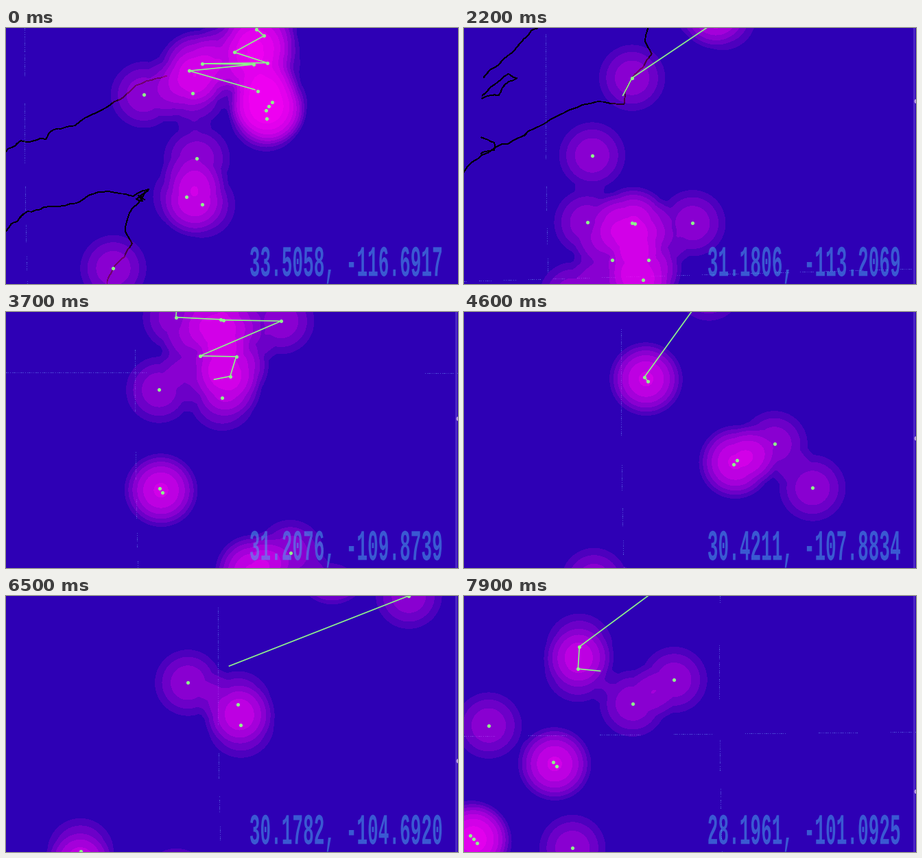
Write a matplotlib script that moves like this. It is 659 by 373 pixels and loops after 8000 ms.

```python
import numpy as np
import matplotlib.pyplot as plt
from matplotlib.animation import FuncAnimation
from matplotlib.patches import Ellipse, PathPatch, Rectangle
from matplotlib.textpath import TextPath
from matplotlib.transforms import Affine2D

W, H, DPI = 659, 373, 100
FRAMES, STEP = 80, 100
PX = 72 / DPI

BG = (46 / 255, 0, 181 / 255)
HOT = (250 / 255, 0, 245 / 255)
GREEN = "#90f48c"
LEVELS = 10

# Conic map with north to the right: pixels per degree, cone radius, cone angle
DEG, CONE, TURN = 96, 9623, .00864

# seconds, latitude, longitude of the head
KEYS = np.array([
    (0, 33.5058, -116.6917), (1.5, 32.5651, -115.2161),
    (2.9, 31.2224, -110.9420), (3.7, 31.2076, -109.8739),
    (5.4, 32.0434, -106.2903), (6.5, 30.1782, -104.6920),
    (7.9, 28.1961, -101.0925)])

TOWNS = [
    (33.53, -117.79), (33.64, -117.67), (33.19, -117.37), (33.69, -117.18),
    (32.71, -117.16), (33.49, -117.15), (32.51, -117.03), (33.55, -116.67),
    (32.56, -116.63), (31.82, -116.60), (33.68, -116.17), (32.62, -115.45),
    (32.45, -114.77), (32.69, -114.62), (31.32, -113.52), (30.71, -112.15),
    (30.62, -110.97), (31.30, -110.94), (31.34, -110.93), (32.22, -110.92),
    (30.99, -110.29), (31.54, -110.28), (31.45, -109.93), (30.37, -109.69),
    (31.33, -109.55), (32.33, -106.76), (32.90, -105.96), (29.55, -104.40),
    (30.31, -104.02), (30.35, -103.66), (27.88, -101.51), (27.86, -101.13),
    (29.32, -100.94), (28.69, -100.53), (26.50, -100.17), (27.74, -98.06)]


def chain(lat, lon, n, slope):
    """Neighbouring sites in an even diagonal row."""
    return [(lat + slope * .05 * i, lon + .07 * i) for i in range(n)]


SITES = np.array(TOWNS
                 + chain(33.77, -116.46, 3, -1)
                 + chain(30.36, -107.96, 2, 1)
                 + chain(31.76, -106.48, 2, -1)
                 + chain(27.47, -99.54, 2, 1)
                 + chain(26.19, -98.32, 3, 1))

# Key points of the shores in pixels of the view COAST_VIEW
COAST_VIEW = (88.3, 94.2, -115.2161)
PACIFIC = [(0, 140), (33, 98), (65, 57), (84, 46), (120, 44), (130, 31),
           (162, 25), (207, 0), (241, -22), (297, -46)]
GULF = [(0, 236), (40, 200), (68, 167), (92, 149), (140, 142), (196, 122),
        (247, 129), (269, 119), (234, 180), (244, 198), (216, 233),
        (205, 272), (165, 269), (90, 302), (28, 333), (0, 349), (-60, 390)]
DELTA = [(268, 121), (251, 133), (260, 136), (254, 128), (263, 134)]
ISLAND = [(-2, 267), (22, 262), (27, 251), (48, 237), (35, 231), (-2, 263)]
ISLET = [(-2, 324), (17, 331), (17, 342), (-2, 347)]


def project(lat, lon, view):
    x0, y0, mid = view
    r = CONE - DEG * (np.asarray(lat) - 30)
    a = TURN * (np.asarray(lon) - mid)
    return x0 + CONE - r * np.cos(a), y0 + r * np.sin(a)


def unproject(x, y, view):
    x0, y0, mid = view
    dx, dy = x0 + CONE - x, y - y0
    return 30 + (CONE - np.hypot(dx, dy)) / DEG, mid + np.arctan2(dy, dx) / TURN


def shore(points, rng, rounds=3, rough=.05):
    """Roughen a polyline by moving midpoints sideways; ends with a gap."""
    z = np.array([complex(*p) for p in points])
    for _ in range(rounds):
        step = np.diff(z)
        mid = z[:-1] + step * (.5 + 1j * rough * rng.standard_normal(len(step)))
        z = np.append(np.column_stack([z[:-1], mid]).ravel(), z[-1])
    lat, lon = unproject(z.real, z.imag, COAST_VIEW)
    return np.array([np.append(lat, np.nan), np.append(lon, np.nan)])


rng = np.random.default_rng(4)
COAST = np.hstack([shore(s, rng) for s in (PACIFIC, GULF, DELTA, ISLAND, ISLET)])

# The trail visits every site from west to east
TRAIL = np.vstack([SITES, KEYS[:, 1:]])
TRAIL = TRAIL[np.argsort(TRAIL[:, 1])]
hops = np.hypot(np.diff(TRAIL[:, 0]) * DEG, np.diff(TRAIL[:, 1]) * 82)
DIST = np.concatenate([[0], np.cumsum(hops)])
KEY_DIST = np.interp(KEYS[:, 2], TRAIL[:, 1], DIST)


def state(t):
    """Travelled distance, head position, scroll fraction and view at time t."""
    d = np.interp(t, KEYS[:, 0], KEY_DIST)
    lat = np.interp(d, DIST, TRAIL[:, 0])
    lon = np.interp(d, DIST, TRAIL[:, 1])
    frac = (d - KEY_DIST[0]) / (KEY_DIST[-1] - KEY_DIST[0])
    view = (26.2 + 345.5 * frac, 98.2 - 3.67 * (lat - 31.22), lon)
    return d, lat, lon, frac, view


def heat(xs, ys, reach=60, peak=.385, power=1.3):
    cool = np.ones((H, W))
    for x, y in zip(xs, ys):
        l, r = np.clip([int(x - reach), int(x + reach) + 2], 0, W)
        t, b = np.clip([int(y - reach), int(y + reach) + 2], 0, H)
        if l >= r or t >= b:
            continue
        gx = np.arange(l, r) + .5 - x
        gy = np.arange(t, b)[:, None] + .5 - y
        fall = np.clip(1 - (gx**2 + gy**2) / reach**2, 0, 1) ** power
        cool[t:b, l:r] *= 1 - peak * fall
    level = np.floor(LEVELS * (1 - cool))
    rgba = np.empty((H, W, 4))
    rgba[..., :3] = HOT
    rgba[..., 3] = np.sin(np.pi / 2 * level / LEVELS)
    return rgba


def hairline(along, across):
    """Pixels of a dotted line, shown only where it falls on whole pixels."""
    row = np.floor(across)
    keep = (abs(across - row - .5) < .28) & (np.floor(along) * 7 % 11 < 5)
    return np.floor(along[keep]) + .5, row[keep] + .5


def graticule(view):
    x, y = project(30, np.linspace(view[2] - 2, view[2] + 4, 480), view)
    py, px = hairline(y, x)
    for lon in (-110, -100):
        mx, my = hairline(*project(np.linspace(24, 37, 1250), lon, view))
        px, py = np.append(px, mx), np.append(py, my)
    return px, py


def label_path(lat, lon):
    return TextPath((0, 0), f"{lat:.4f}, {lon:.4f}", size=26.1,
                    prop={"family": "Liberation Mono", "weight": "bold"})


fig = plt.figure(figsize=(W / DPI, H / DPI), dpi=DPI, facecolor=BG)
ax = fig.add_axes([0, 0, 1, 1])
ax.axis("off")

coast, = ax.plot([], [], color="black", lw=.8 * PX, antialiased=False, zorder=1)
grid, = ax.plot([], [], "s", color="#6a8cf5", alpha=.6, ms=PX, mew=0, zorder=1)
glow = ax.imshow(np.zeros((H, W, 4)), extent=(0, W, H, 0), aspect="auto",
                 interpolation="nearest", zorder=2)
trail, = ax.plot([], [], color=GREEN, lw=1.7 * PX, zorder=3)
dots, = ax.plot([], [], "o", color=GREEN, ms=5.2 * PX, mew=0, zorder=4)
tall = Affine2D().scale(1, -2.44).translate(354.8, 361.3)
label = ax.add_patch(PathPatch(label_path(0, 0), fc=(.275, .7, .94), lw=0,
                               alpha=.5, zorder=5, transform=tall + ax.transData))
rail = ax.add_patch(Rectangle((655, 0), 3, H, fc="#4d26c6", lw=0, zorder=6))
thumb = ax.add_patch(Ellipse((658.5, 0), 4, 6, fc="#b89ae6", lw=0, zorder=7))
ax.set_xlim(0, W)
ax.set_ylim(H, 0)


def draw(i):
    d, lat, lon, frac, view = state(i * STEP / 1000)
    xs, ys = project(SITES[:, 0], SITES[:, 1], view)
    glow.set_data(heat(xs, ys))
    dots.set_data(xs, ys)
    done = np.vstack([TRAIL[DIST < d], (lat, lon)])
    trail.set_data(*project(done[:, 0], done[:, 1], view))
    coast.set_data(*project(*COAST, view))
    grid.set_data(*graticule(view))
    label.set_path(label_path(lat, lon))
    thumb.center = (658.5, 42 + 243 * frac)
    for part in (rail, thumb):
        part.set_visible(i > 0)
    return glow, dots, trail, coast, grid, label, rail, thumb


anim = FuncAnimation(fig, draw, frames=FRAMES, interval=STEP, repeat=True,
                     repeat_delay=0, blit=False)
plt.show()
```
